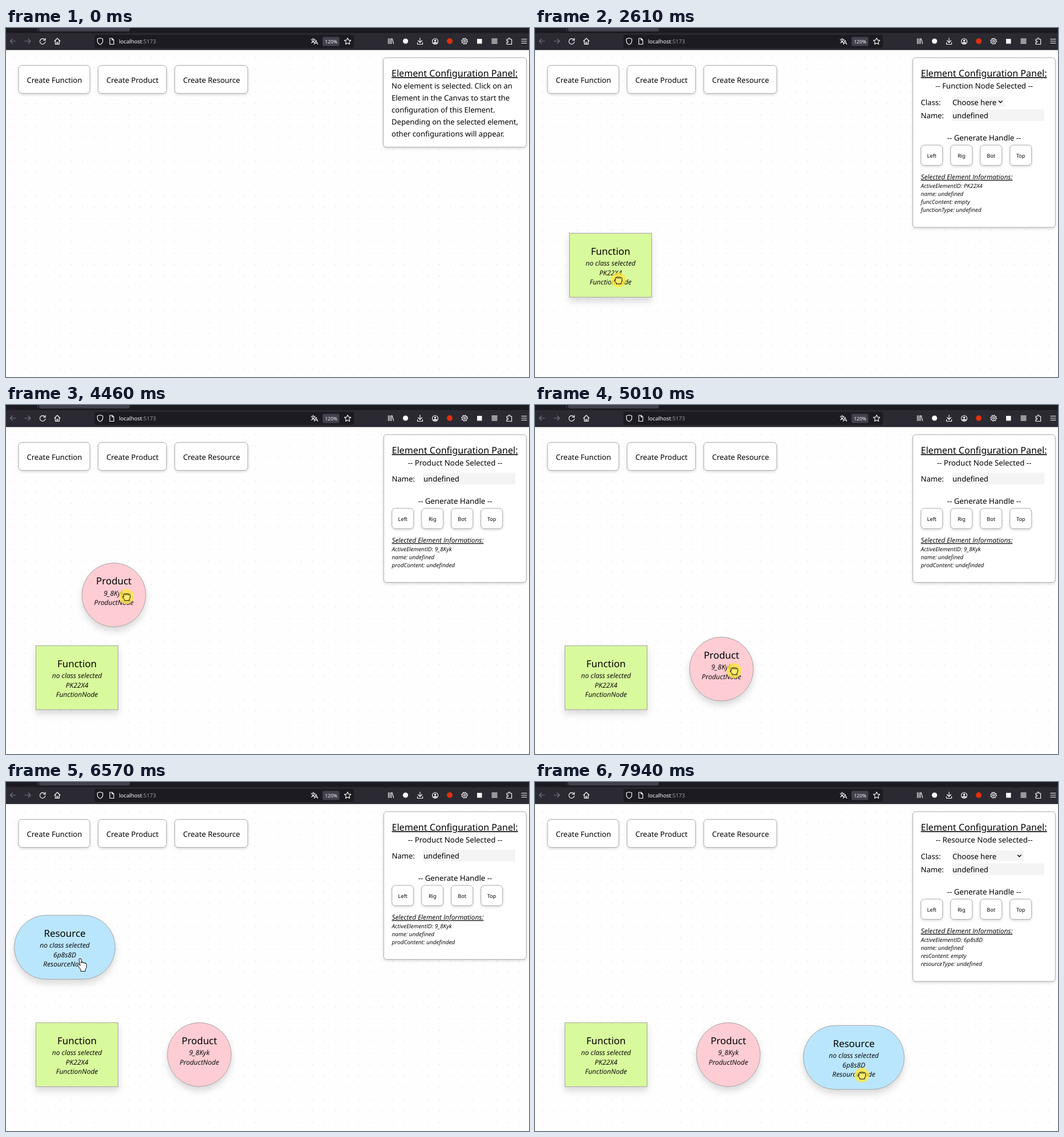
Write an HTML page that moves like this. It is 917 px wide and 611 px high and loops after 8 s.

```html
<!DOCTYPE html>
<html lang="en">
<head>
<meta charset="utf-8">
<title>Element editor</title>
<style>
html, body { margin: 0; width: 100%; height: 100%; overflow: hidden; background: #fff; }
svg { display: block; width: 917px; height: 611px; font: 13.05px "Noto Sans", "Open Sans", sans-serif; text-rendering: geometricPrecision; }
.icons { fill: none; stroke: #fbfbfe; stroke-width: 1.15; stroke-linejoin: round; stroke-linecap: round; }
.box { fill: #fff; stroke: #aaa; filter: drop-shadow(0 2px 2px rgba(0,0,0,.14)); }
.shape { stroke: #a3a3a3; filter: drop-shadow(0 7px 6px rgba(0,0,0,.14)); }
.mid { text-anchor: middle; }
.title { font-size: 16.1px; text-decoration: underline; text-decoration-thickness: 1px; }
.head { font-size: 13.25px; }
.tiny { font-size: 9.1px; }
.sub, .info, .detail { font-family: "Open Sans", "Noto Sans", sans-serif; font-style: italic; }
.sub { font-size: 11.85px; text-decoration: underline; }
.info { font-size: 10px; }
.name { font-size: 16.9px; }
.detail { font-size: 12px; }
#cursor path { fill: #fff; stroke: #000; stroke-linejoin: round; }
</style>
</head>
<body>
<svg viewBox="0 0 917 611">
  <defs>
    <pattern id="dots" x="3.5" y="41.5" width="20.16" height="20.16" patternUnits="userSpaceOnUse">
      <circle cx="10" cy="10" r=".6" fill="#c4c4c4"/>
    </pattern>
  </defs>
  <rect y="38" width="917" height="573" fill="#fefefe"/>
  <rect y="38" width="917" height="573" fill="url(#dots)"/>

  <rect width="917" height="38" fill="#2b2a33"/>
  <rect width="917" height="9" fill="#1c1b22"/>
  <rect y="37.5" width="917" height="1" fill="#111016"/>
  <rect x="58" y="-6" width="159" height="12" rx="3" fill="#42414d"/>
  <path d="M55.5 0v6" stroke="#45444e"/>
  <rect x="155" y="12" width="455" height="23" rx="4" fill="#1c1b22"/>
  <rect x="555" y="15.5" width="29.5" height="16" rx="3" fill="#42414d"/>
  <g class="icons">
    <path stroke="#77767d" d="M17 23H7.500m4-4-4 4 4 4M33 23h10m-4-4 4 4-4 4"/>
    <path d="M68 20.500A4.800 4.800 0 1 0 69 24M69 18v3.500h-3.500M85 23l5-5 5 5M86.500 22v6.500h7V22M89 28v-3h2v3"/>
    <path d="M165 17.500l4.700 1.500v3.500q0 4.500-4.700 6.500-4.700-2-4.700-6.500V19zM182 18h4l3 3v7.500h-7zM186 18v3h3"/>
    <path d="M535 20h7M538.500 18v2M541 20q-1 4-5.500 6M536.500 21.500q1.500 3 4 4M540.500 28.500l3-7 3 7M541.500 26.500h4"/>
    <path d="M599 17.500l1.700 3.600 4 .5-2.900 2.800.7 4-3.500-1.900-3.500 1.900.7-4-2.900-2.800 4-.5z"/>
    <path d="M670.500 18.500v9M673 18.500v9M675.500 18.500v9M677 18.500l2.500 9M726 17.500v8m-3.500-3.500 3.500 3.500 3.500-3.500M721.500 25.500v3h9v-3"/>
    <circle cx="752.5" cy="23.5" r="5"/>
    <path fill="#fbfbfe" d="M749.500 26q3-2 6 0-3 2-6 0zM751.300 22a1.200 1.200 0 1 1 2.400 0a1.200 1.200 0 1 1-2.400 0z"/>
    <circle cx="804" cy="23" r="4.2"/><circle cx="804" cy="23" r="1.6"/>
    <circle cx="804" cy="23" r="5.3" stroke-dasharray="1.8 2.36" stroke-linecap="butt"/>
    <path d="M878 28.500v-3.200q2.500.5 2.500-1.300t-2.500-1.300v-3h3q-.3-2.200 1.300-2.200t1.300 2.200h3v8.800z"/>
    <path d="M904 19.500h9m-9 3.500h9m-9 3.500h9"/>
  </g>
  <circle cx="700.5" cy="23" r="4.6" fill="#fbfbfe"/>
  <circle cx="778" cy="23" r="5" fill="#e0300f"/>
  <rect x="826" y="19" width="8.5" height="8.5" fill="#fbfbfe"/>
  <rect x="851.5" y="18" width="10" height="10" fill="#999"/>
  <text x="198" y="27" font-size="9.6" fill="#fbfbfe">localhost<tspan fill="#9a999f">:5173</tspan></text>
  <text class="mid" x="570" y="26.6" font-size="8.5" fill="#fbfbfe">120%</text>

  <g id="ui"></g>
  <g id="cursor">
    <circle id="glow" r="13" fill="#ffe53b" opacity=".78"/>
    <path id="hand"/>
  </g>
</svg>
<script>
const $ = id => document.getElementById(id);
const text = (cls, x, y, s) => `<text class="${cls}" x="${x}" y="${y}">${s}</text>`;
const box = (x, y, w, h, r = 6) => `<rect class="box" x="${x}" y="${y}" width="${w}" height="${h}" rx="${r}"/>`;
const field = (y, w, h) => `<rect x="731" y="${y}" width="${w}" height="${h}" fill="#f4f4f5"/>`;

const buttons = [['Function', 22, 125], ['Product', 161.5, 120], ['Resource', 295.9, 128]];
const button = ([label, x, w]) => box(x, 65.5, w, 49) + text('', x + 14.5, 96, 'Create ' + label);

// One entry per node: home place, size, and the times it is created, gripped and dropped
const nodes = [
  { id: 'fn', name: 'Function', lines: ['no class selected', 'PK22X4', 'FunctionNode'], fill: '#d9f99d',
    x: 14.5, w: 144, r: 0, made: 1670, grip: 2280, drop: 2980 },
  { id: 'pr', name: 'Product', lines: ['9_8Kyk', 'ProductNode'], fill: '#fecdd3',
    x: 15, w: 112, r: 56, made: 3630, grip: 4050, drop: 5290 },
  { id: 're', name: 'Resource', lines: ['no class selected', '6p8s8D', 'ResourceNode'], fill: '#bae6fd',
    x: 14.5, w: 177, r: 56, made: 6090, grip: 6620, drop: 9000 }
];
const homeY = 233.3, nodeH = 112;

const nodeMarkup = n => `<g id="${n.id}">
  <rect class="shape" width="${n.w}" height="${nodeH}" rx="${n.r}" fill="${n.fill}"/>
  ${text('name mid', n.w / 2, 37.5, n.name)}
  ${n.lines.map((s, i) => text('detail mid', n.w / 2, 57 + i * 16.3, s)).join('')}</g>`;

function panelMarkup(id, heading, info, selectW) {
  const dy = selectW ? 0 : -24;
  const arrow = 731 + selectW - 11;
  return `<g id="${id}">${box(662.3, 52, 250, 297 + dy * 1.6, 5)}
    ${text('title', 676.5, 85, 'Element Configuration Panel:')}
    ${text('head mid', 787.5, 106, heading)}
    ${selectW ? field(120, selectW, 18) + text('', 676.5, 134.5, 'Class:') + text('', 732, 134.5, 'Choose here') +
      `<path d="M${arrow} 127.5l3.3 3.3 3.3-3.3" fill="none" stroke="#000" stroke-width="1.4"/>` : ''}
    <g transform="translate(0 ${dy})">${field(142.5, 162, 20.5)}
    ${text('', 676.5, 158.3, 'Name:')}${text('', 732, 158.3, 'undefined')}
    ${text('head mid', 787.5, 196.5, '-- Generate Handle --')}
    ${['Left', 'Rig', 'Bot', 'Top'].map((s, i) =>
      box(676.7 + i * 52, 205, 38, 35.5) + text('tiny mid', 695.7 + i * 52, 227, s)).join('')}
    ${text('sub', 676.5, 265, 'Selected Element Informations:')}
    ${info.map((s, i) => text('info', 676.5, 279.5 + i * 14, s)).join('')}</g></g>`;
}

const emptyPanel = `<g id="panel0">${box(661.5, 52, 251, 156.5, 5)}
  ${text('title', 676, 85, 'Element Configuration Panel:')}
  ${['No element is selected. Click on an', 'Element in the Canvas to start the', 'configuration of this Element.',
    'Depending on the selected element,', 'other configurations will appear.']
    .map((s, i) => text('', 676, 106.3 + i * 20.8, s)).join('')}</g>`;

$('ui').innerHTML = buttons.map(button).join('') + nodes.map(nodeMarkup).join('') + emptyPanel +
  panelMarkup('panel1', '-- Function Node Selected --',
    ['ActiveElementID: PK22X4', 'name: undefined', 'funcContent: empty', 'functionType: undefined'], 93) +
  panelMarkup('panel2', '-- Product Node Selected --',
    ['ActiveElementID: 9_8Kyk', 'name: undefined', 'prodContent: undefinded'], 0) +
  panelMarkup('panel3', '-- Resource Node selected--',
    ['ActiveElementID: 6p8s8D', 'name: undefined', 'resContent: empty', 'resourceType: undefined'], 126);

const hands = {
  point: 'M-2 1a2 2 0 0 1 4 0v6q0-1.5 1.7-1.5t1.7 1.7q.3-1.2 1.7-1t1.5 1.8q.4-.9 1.5-.5t1 2v5l-2 4v3h-8v-3l-5-7q-1-2 .5-2.7t2 .7l1.4 2z',
  open: 'M-3 8L-8 1q0-2 2-1l2 2-2.5-7q.5-2 2.2-.5L-2.5-1-2.6-7q1.3-1.7 2.4 0L.4-1.5 2-7q1.6-1.2 2.2.5L3.7-1 6-4.5q2-.6 1.8 1.2L6 3 4.5 8z',
  grab: 'M-3.5 7v-2L-6.5 2q-1-2.5 1.5-2.5V-3q.5-2.5 3-1.5 1-2 2.7 0 1.500-1.500 2.800.3 2.500-.7 3 1.700V2L5 5v2zM-5-.5v2M-2-4.500v2.300M.7-4.500v2.300M3.500-4.200v2.300'
};

// Cursor stops: time, x, y, eased
const stops = [
  [760, 352, 527], [1530, 101, 91, 1], [1930, 101, 91], [2210, 100, 315, 1], [2280, 100, 315],
  [2630, 146, 441], [2700, 144, 454], [2980, 138, 503], [3500, 208, 93, 1], [3570, 208, 93],
  [3846, 152, 239], [3980, 93, 292], [4050, 93, 292], [4330, 179, 305], [5012, 349, 465],
  [5150, 355, 473], [5290, 361, 480], [5810, 352, 85, 1], [5880, 352, 85], [5960, 340, 97],
  [6090, 340, 97], [6546, 130, 310], [6620, 117, 320], [6850, 177, 311], [7680, 573, 505],
  [7900, 573, 513], [8000, 573, 513]
];
// Bursts of motion: start, end, steps
const bursts = [
  [760, 1530, 12], [1600, 1730, 3], [1930, 2700, 12], [2760, 3500, 11], [3570, 4330, 12],
  [4390, 5150, 12], [5220, 5960, 11], [6090, 6850, 11], [6920, 7680, 12], [7740, 7940, 4]
];
const clicks = [[1600, 1730], [3500, 3600], [5810, 5950]];

function stepTime(t) {
  const b = bursts.filter(b => b[0] <= t).pop();
  if (!b) return 0;
  const [start, end, n] = b, d = (end - start) / (n - 1);
  return start + d * Math.min(n - 1, Math.floor((t - start) / d + .35));
}

function cursorAt(t) {
  const i = Math.max(1, stops.findIndex(s => s[0] >= t));
  const [t0, x0, y0] = stops[i - 1], [t1, x1, y1, eased] = stops[i];
  let k = (t - t0) / (t1 - t0);
  if (eased) k = k * k * (3 - 2 * k);
  return [x0 + (x1 - x0) * k, y0 + (y1 - y0) * k];
}

function nodeAt(n, t) {
  const [x0, y0] = cursorAt(n.grip);
  const [x, y] = cursorAt(Math.min(Math.max(t, n.grip), n.drop));
  return [n.x + x - x0, homeY + y - y0];
}

const show = (id, on) => $(id).setAttribute('visibility', on ? 'visible' : 'hidden');
const place = (id, x, y) => $(id).setAttribute('transform', `translate(${x} ${y})`);

function draw(now) {
  const t = stepTime(now % 8000);
  const [cx, cy] = cursorAt(Math.max(t, 760));
  const inside = (x, y, w, h) => cx >= x && cx <= x + w && cy >= y && cy <= y + h;
  let over = buttons.some(([, x, w]) => inside(x, 65, w, 50));
  let held = false;
  for (const n of nodes) {
    const [x, y] = nodeAt(n, t), made = t >= n.made;
    place(n.id, x, y);
    show(n.id, made);
    over ||= made && inside(x, y, n.w, nodeH);
    held ||= t >= n.grip && t < n.drop;
  }
  const active = nodes.filter(n => t >= n.grip).length;
  for (let i = 0; i < 4; i++) show('panel' + i, i === active);

  show('cursor', t >= 760);
  place('cursor', cx, cy);
  $('glow').style.display = held || clicks.some(([a, b]) => t >= a && t < b) ? '' : 'none';
  $('hand').setAttribute('d', hands[held ? 'grab' : over ? 'point' : 'open']);
  $('hand').style.fill = held ? '#ffeb70' : '#fff';
  requestAnimationFrame(draw);
}
draw(0);
</script>
</body>
</html>
```
